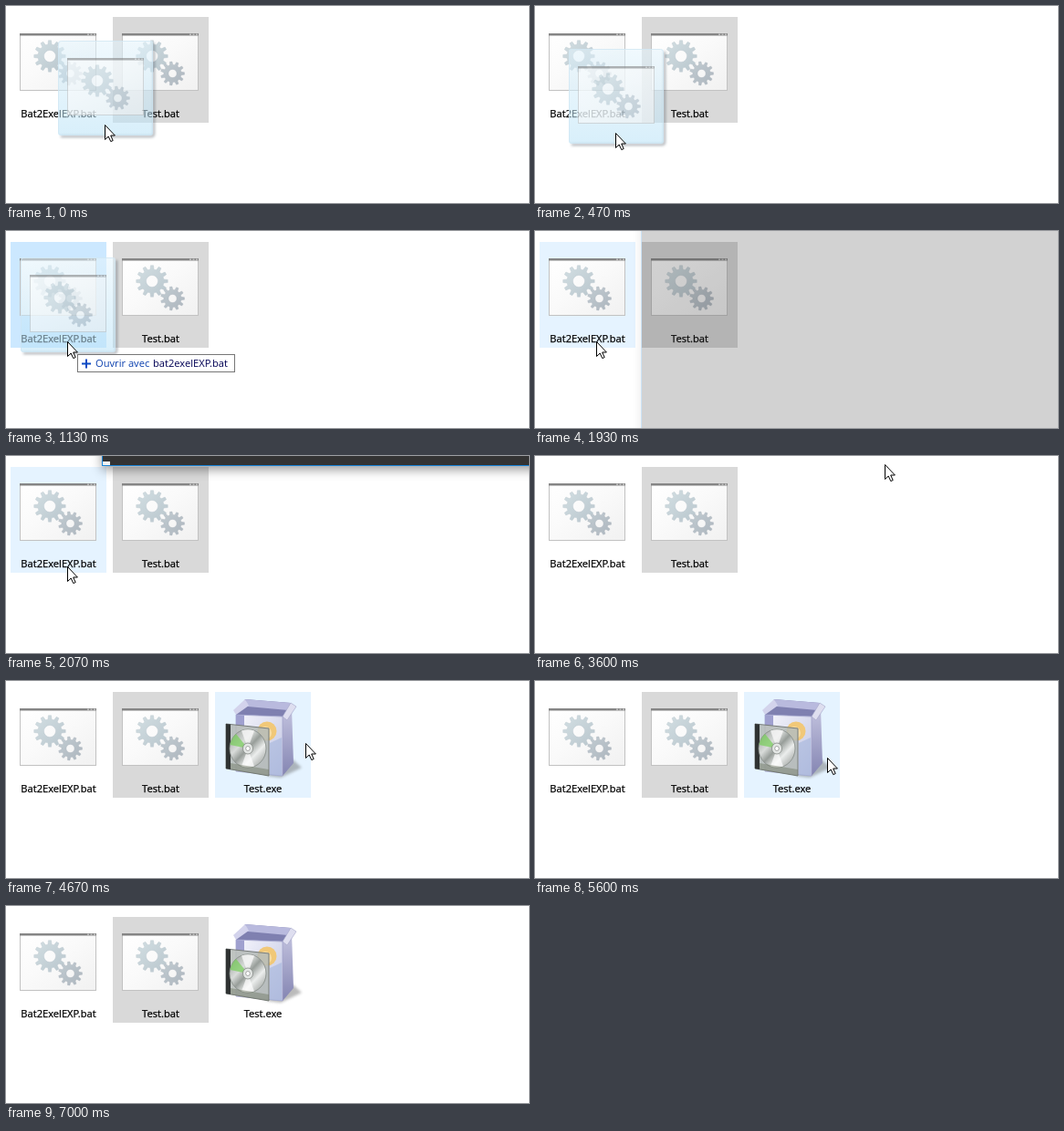
Animation, 573 px wide and 216 px high, one loop 7.94 s. Source, as an HTML page:

```html
<!DOCTYPE html>
<html lang="fr">
<head>
<meta charset="utf-8">
<title>Bat2ExelEXP</title>
<style>
html, body { margin: 0; width: 100%; height: 100%; overflow: hidden; background: #fff; }
svg { display: block; width: 100%; height: 100%; }
text { font: 11.15px "Open Sans", "Noto Sans", sans-serif; }
.label { text-anchor: middle; stroke: #000; stroke-width: .25px; }
#console { filter: drop-shadow(0 4px 6px rgba(0,0,0,.4)); }
</style>
</head>
<body>
<svg viewBox="0 0 573 216">
  <defs>
    <linearGradient id="page" x2="1" y2="1">
      <stop stop-color="#fff"/><stop offset=".45" stop-color="#fafafa"/><stop offset="1" stop-color="#f1f1f1"/>
    </linearGradient>
    <linearGradient id="steel" x2="1" y2="1">
      <stop stop-color="#d3dfe3"/><stop offset="1" stop-color="#b9c6cd"/>
    </linearGradient>
    <linearGradient id="steelDark" x2="1" y2="1">
      <stop stop-color="#c2ccd2"/><stop offset="1" stop-color="#adb6be"/>
    </linearGradient>
    <linearGradient id="glass" x2="0" y2="1">
      <stop stop-color="#e4f4fc"/><stop offset="1" stop-color="#b8e2f7"/>
    </linearGradient>
    <linearGradient id="front" x2="1" y2="1">
      <stop stop-color="#f6f6fd"/><stop offset="1" stop-color="#bfc3e0"/>
    </linearGradient>
    <linearGradient id="side" x2="0" y2="1">
      <stop stop-color="#c3c3df"/><stop offset="1" stop-color="#8485b2"/>
    </linearGradient>
    <linearGradient id="disc" x2="1" y2="1">
      <stop stop-color="#8e9490"/><stop offset=".35" stop-color="#d9dcda"/><stop offset=".5" stop-color="#979d99"/>
      <stop offset=".68" stop-color="#eceeed"/><stop offset="1" stop-color="#888d8a"/>
    </linearGradient>
    <filter id="soft" x="-20%" y="-20%" width="140%" height="140%"><feGaussianBlur stdDeviation="1.5"/></filter>

    <g id="script">
      <rect x=".5" y="1.5" width="83" height="62" fill="url(#page)" stroke="#c2c2c2"/>
      <path d="M0 1H84V3.5H0Z" fill="#858585"/>
      <path d="M74 2.2h2m1.5 0h2m1.5 0h2" stroke="#ddd"/>
      <path id="bigGear" fill="url(#steel)" stroke="#b9c6cc" stroke-width=".4" fill-rule="evenodd"/>
      <path id="smallGear" fill="url(#steelDark)" stroke="#a9b2ba" stroke-width=".4" fill-rule="evenodd"/>
    </g>
  </defs>

  <rect id="hover1" x="5" y="12" width="105" height="116"/>
  <rect x="117" y="12" width="105" height="116" fill="#d9d9d9"/>
  <use href="#script" x="15" y="29"/>
  <use href="#script" x="127" y="29"/>
  <text class="label" x="57.5" y="122">Bat2ExelEXP.bat</text>
  <text class="label" x="169.5" y="122">Test.bat</text>

  <g id="exe">
    <rect id="hover3" x="229" y="12" width="105" height="116" fill="#e5f3ff"/>
    <path d="M285 104L314 86L324 95L301 106Z" fill="#555" opacity=".4" filter="url(#soft)"/>
    <path d="M262 20L312 24L304 39L252 37Z" fill="#7f80b0"/>
    <path d="M262 20L312 24L309 32L265 28Z" fill="#b9bade"/>
    <path d="M252 37L249 32L262 20L266 27Z" fill="#d3d3ec"/>
    <path d="M303 39L313 30L315 90L303 104Z" fill="url(#side)"/>
    <path d="M303 39L312 24L318 28L308 43Z" fill="#dedeef" stroke="#a3a4c8" stroke-width=".6"/>
    <path d="M252 37L303 39V104L252 99Z" fill="url(#front)" stroke="#a3a4cc" stroke-width=".8"/>
    <path d="M252 37L261 37.4V49H252Z" fill="#9fa0cf"/>
    <circle cx="286" cy="55" r="10.5" fill="#f1c878"/>
    <circle cx="284" cy="57" r="7" fill="#f7dda6"/>
    <path d="M289 68L302 62V104L289 103Z" fill="#a5b5dc" opacity=".6"/>
    <path d="M241 47L288 52V104L241 96Z" fill="#b4bab7" fill-opacity=".85" stroke="#777c7a"/>
    <path d="M241 47L246 47.6V97L241 96Z" fill="#2f3232"/>
    <ellipse cx="265" cy="74" rx="20" ry="21" fill="url(#disc)" stroke="#858b87" stroke-width=".8"/>
    <path d="M265 74L245.5 70A20 21 0 0 1 252 58Z" fill="#78cf5a" opacity=".7"/>
    <path d="M265 74L258 54.5A20 21 0 0 1 272 54.5Z" fill="#f7f8f7" opacity=".8"/>
    <path d="M265 74L272 93.5A20 21 0 0 1 258 93.5Z" fill="#fff" opacity=".7"/>
    <path d="M246 90L288 97V104L246 97Z" fill="#6d7563" opacity=".45"/>
    <ellipse cx="265" cy="74" rx="5.5" ry="6" fill="#e3e6e4" stroke="#848986" stroke-width=".8"/>
    <ellipse cx="265" cy="74" rx="2.3" ry="2.5" fill="#fff" stroke="#777" stroke-width=".6"/>
    <text class="label" x="281.5" y="122">Test.exe</text>
  </g>

  <g id="console">
    <rect id="frame" y="-20" width="520" fill="#333" stroke="#1883d7"/>
    <rect id="caret" width="8" height="4" fill="#f2f2f2"/>
  </g>

  <g id="ghost">
    <path d="M-49 12H50Q53 12 53 9V-90" fill="none" stroke="#3c4a55" stroke-width="2" opacity=".5" filter="url(#soft)"/>
    <rect x="-52" y="-93" width="104" height="104" rx="3" fill="url(#glass)" opacity=".55"/>
    <rect x="-51.5" y="-92.5" width="103" height="103" rx="3" fill="none" stroke="#cfe6f2" stroke-opacity=".7"/>
    <use href="#script" x="-42" y="-75" opacity=".6"/>
  </g>

  <g id="tip">
    <rect x="10.5" y="13.5" width="172" height="19" fill="#fff" stroke="#767676"/>
    <path d="M15 23.5h10m-5 -5v10" stroke="#0b4bc4" stroke-width="2"/>
    <text x="30" y="27" fill="#0a3fae">Ouvrir avec</text>
    <text x="93" y="27" fill="#000054">bat2exelEXP.bat</text>
  </g>
  <path id="cursor" d="M-.5 -.5V15.5L3.2 12L5.8 17.6L8.2 16.5L5.7 11H10.4Z" fill="#fff" stroke="#000"/>
</svg>
<script>
const LOOP = 7940;
const STEP = 200 / 3;
const TURN = 2 * Math.PI;

const el = id => document.getElementById(id);
const set = (id, attrs) => {
  for (const k in attrs) el(id).setAttribute(k, attrs[k]);
};
const show = (id, on) => set(id, { visibility: on ? 'visible' : 'hidden' });

const ramp = (t, start, end) => Math.max(0, Math.min(1, (t - start) / (end - start)));
const smooth = p => p * p * (3 - 2 * p);
const glide = (from, to, p) => from.map((v, i) => v + (to[i] - v) * p);
const orbit = (cx, cy, rx, ry, a) => [cx + rx * Math.cos(a), cy - ry * Math.sin(a)];

function gear(cx, cy, teeth, outer, inner, hole) {
  const pitch = TURN / teeth;
  const pts = [];
  for (let i = 0; i < teeth; i++) {
    for (const [r, shift] of [[inner, -.3], [outer, -.17], [outer, .17], [inner, .3]]) {
      pts.push(orbit(cx, cy, r, r, (i + shift) * pitch).map(v => v.toFixed(2)).join(' '));
    }
  }
  const half = `a${hole} ${hole} 0 1 0 `;
  return `M${pts.join('L')}ZM${cx - hole} ${cy}${half}${2 * hole} 0${half}${-2 * hole} 0Z`;
}
set('bigGear', { d: gear(33, 26, 12, 17.3, 13, 6.5) });
set('smallGear', { d: gear(55.5, 45, 11, 13, 9.6, 4.6) });

function pointer(t) {
  const drop = [68, 122], rest = [370, 57], edge = [331, 79], low = [258, 112];
  // drag, drop, leave through the top
  if (t < 1130) return glide([109, 131], [80, 144], ramp(t, 0, 670));
  if (t < 3600) return glide(drop, [190, -25], ramp(t, 2600, 2870));
  // come back and circle the new file twice
  if (t < 3670) return [384, 10];
  if (t < 4600) return glide(rest, edge, ramp(t, 4000, 4470));
  if (t < 5400) return orbit(306, 79, 25, 25, .75 * TURN * ramp(t, 4600, 5400));
  if (t < 6200) return orbit(282, 66, 43, 47, .81 * TURN * ramp(t, 5400, 6200) ** 1.6 - .97);
  // leave through the bottom
  if (t < 6930) return glide(low, [248, 171], ramp(t, 6200, 6730));
  return t < 7000 ? [224, 189] : [-50, -50];
}

// The screen is sampled 15 times a second, on 10 ms marks
const snap = t => Math.round(Math.floor(t / STEP + .051) * STEP / 10) * 10;

function drawConsole(t) {
  const alpha = smooth(ramp(t, 1870, 2070)) - smooth(ramp(t, 2600, 2870));
  const left = Math.round(106 + 14 * (1 - alpha));
  const bottom = t < 2070 ? 230 : 10.5;
  set('console', { opacity: alpha, display: alpha > 0 ? 'inline' : 'none' });
  set('frame', { x: left - .5, height: bottom + 20 });
  set('caret', { x: left, y: bottom - 4.5 });
}

function draw(now) {
  const t = snap(now % LOOP);
  const [x, y] = pointer(t).map(Math.round);
  for (const id of ['cursor', 'ghost', 'tip']) set(id, { transform: `translate(${x} ${y})` });
  show('ghost', t < 1600);
  show('tip', t >= 1130 && t < 1600);

  show('hover1', t >= 1130 && t < 2730);
  set('hover1', { fill: t < 1800 ? '#cce8ff' : '#e5f3ff' });
  set('exe', { display: t >= 4070 ? 'inline' : 'none' });
  set('hover3', { opacity: x >= 229 && x < 334 && y >= 12 && y < 128 ? 1 : 0 });
  drawConsole(t);
}

function tick() {
  draw(performance.now());
  requestAnimationFrame(tick);
}
tick();
</script>
</body>
</html>
```
